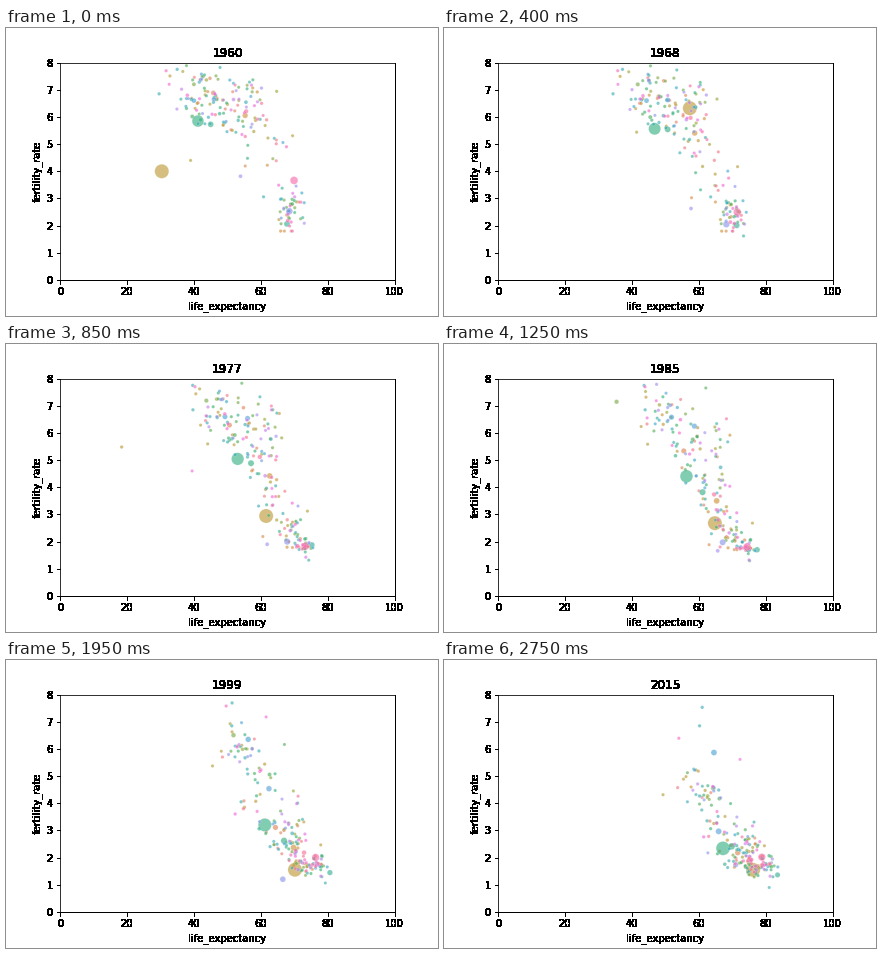
Animation of 432 by 288 pixels, one loop 2800 ms. Source, as a matplotlib script:

```python
import numpy as np
import matplotlib.pyplot as plt
from matplotlib.animation import FuncAnimation
from matplotlib.colors import to_rgb

FIRST, LAST = 1960, 2015
YEARS = np.arange(FIRST, LAST + 1)
WHEEL = ["#f77189", "#ce9032", "#97a431", "#32b166",
         "#36ada4", "#39a7d0", "#a48cf4", "#f561dd"]
SMALL, LARGE = 10, 200

rng = np.random.default_rng(12)
countries = []  # (hue, share per year, life per year, fertility per year)


def wheel_color(hue):
    stops = np.array([to_rgb(c) for c in WHEEL + WHEEL[:1]])
    pos = np.linspace(0, 1, len(stops))
    return [np.interp(hue, pos, stops[:, k]) for k in range(3)]


def country(hue, share, life, high, *falls, crisis=None):
    """Life runs through evenly spaced levels; each fall is (drop, year, width).

    A crisis is (year, width, loss of life, loss of fertility).
    """
    share = np.linspace(share[0], share[-1], len(YEARS))
    life = np.interp(YEARS, np.linspace(FIRST, LAST, len(life)), life)
    fert = np.full(len(YEARS), float(high))
    for drop, year, width in falls:
        fert -= drop / (1 + np.exp((year - YEARS) / width))
    if crisis:
        year, width, life_loss, fert_loss = crisis
        pulse = np.exp(-0.5 * ((YEARS - year) / width) ** 2)
        life = life - life_loss * pulse
        fert -= fert_loss * pulse
    countries.append((hue, share, life, fert))


def crowd(count, life, spread, high, low, mid, width):
    """Small countries; high, low and mid are (mean, spread)."""
    for _ in range(count):
        rank = np.clip(rng.normal(), -1.7, 1.7)
        noise = np.clip(rng.normal(size=6), -1.8, 1.8)
        level = np.array(life) + np.array(spread) * (0.75 * rank + 0.65 * noise[:3])
        top = high[0] + high[1] * noise[3]
        floor = low[0] + low[1] * (noise[4] - 0.2 * rank)
        turn = mid[0] + mid[1] * (0.75 * noise[5] - 0.65 * rank)
        share = 0.0015 / (rng.random() + 0.03)
        country(rng.random(), [share], level, top, (top - floor, turn, width))


# The most populous countries
country(0.165, (1, 1), (53.5, 62.2, 69.3, 76.2), 6.45,
        (3.75, 1973, 1.5), (1.15, 1991, 1.5), crisis=(1960, 1, 23.1, 2.45))
country(0.43, (0.675, 0.955), (41.2, 54, 60.3, 67.2), 6.2, (4.3, 1989, 12))
country(0.95, (0.27, 0.234), (69.9, 73.5, 76, 78.8), 3.92,
        (2.15, 1966, 3), (-0.25, 1990, 3))
country(0.72, (0.18, 0.105), (68.5, 67.8, 65.9, 71), 2.65,
        (0.65, 1963, 2), (0.85, 1992, 2), (-0.65, 2008, 3))
country(0.47, (0.14, 0.093), (67.8, 75.8, 80.2, 83.5), 2.1, (0.75, 1984, 8))
country(0.435, (0.13, 0.188), (45, 58, 66.5, 69.8), 5.8, (3.4, 1983, 6))
country(0.12, (0.108, 0.149), (55.3, 63.2, 69, 75), 6.9, (5.2, 1978, 11))
country(0.08, (0.072, 0.114), (45.8, 51, 63.3, 71.6), 6.95, (4.9, 1990, 7))
country(0.66, (0.068, 0.138), (46, 56.8, 61.9, 65.9), 6.65, (3.9, 1998, 6))
country(0.64, (0.068, 0.132), (40, 50, 55, 64.5), 6.6, (0.8, 2003, 5))
country(0.97, (0.05, 0.067), (55.6, 60, 72.5, 75.6), 6.3, (4.4, 1983, 6))

# Countries far from the main cloud
country(0.29, (0.033, 0.073), (40, 44, 50, 64.3), 7.2, (3, 2005, 5),
        crisis=(1984.5, 1.6, 11.3, 0))
country(0.16, (0.01,), (41, 45, 57, 68.5), 6.5, (3.9, 1997, 4),
        crisis=(1976.8, 1.6, 26.5, 1))
country(0.74, (0.006,), (43, 47, 48, 66.5), 8.3, (4.3, 1997, 6),
        crisis=(1994, 0.7, 35, 0))
country(0.41, (0.007,), (42, 51, 58, 63.5), 5.9, (3, 1998, 6),
        crisis=(2010, 0.5, 30, 0))
country(0.88, (0,), (32.6, 40, 60, 72.3), 7.2, (2.4, 2013, 3),
        crisis=(1977, 2.5, 0, 2.6))
country(0.55, (0.01,), (35, 40, 50, 61), 7.75, (0.25, 2005, 5))
country(0.53, (0.01,), (29.6, 40.5, 50, 60.2), 6.85)
country(0.92, (0.006,), (31.7, 41, 49, 54), 7.7, (1.6, 2009, 4))
country(0.2, (0.003,), (39, 44.5, 45, 49.3), 5.6, (1.6, 2008, 5),
        crisis=(1960, 4, 0, 1.2))
for hue in (0.5, 0.99, 0.17, 0.86, 0.05):
    country(hue, (0.01,), np.array([47, 57, 62, 66]) + rng.uniform(-2, 2),
            rng.uniform(5.9, 6.8), (3.5, rng.uniform(1989, 1997), 7),
            crisis=(2005, 5.5, rng.uniform(12, 20), 0))
country(0.52, (0,), (64, 72, 79, 81), 5.5, (3.8, 1965, 2), (0.8, 1995, 3))

# Everyone else, by kind of transition
crowd(26, (69.5, 75, 81), (2.2, 1.4, 1.3), (2.8, 0.45), (1.7, 0.2), (1971, 3), 3)
crowd(20, (66.5, 70.5, 75.5), (2.5, 1.3, 2), (2.7, 0.5), (1.55, 0.15), (1990, 3), 4)
crowd(46, (58, 68, 75.5), (5, 4, 2.8), (6.5, 0.6), (2.0, 0.35), (1974, 9), 7)
crowd(20, (51, 65, 74.5), (5.5, 4, 3.2), (7.3, 0.45), (2.6, 0.5), (1990, 6), 6)
crowd(24, (46, 57, 69), (5, 5, 3.5), (6.6, 0.5), (2.4, 0.5), (1990, 7), 7)
crowd(36, (42, 52, 61.5), (4.5, 4.5, 3.5), (6.75, 0.55), (3.4, 0.5), (2006, 6), 8)

countries.sort(key=lambda c: c[0])
hues, shares, lives, ferts = (np.array(col) for col in zip(*countries))
sizes = SMALL + (LARGE - SMALL) * shares


def harden(img, dpi):
    """Turn every touched pixel solid black, without antialiasing."""
    img[..., :3] = 0
    img[..., 3] = np.ceil(img[..., 3])
    return img, 0, 0


fig, ax = plt.subplots(figsize=(6, 4), dpi=72, facecolor="white")
fig.subplots_adjust(left=0.125, right=0.9, bottom=0.125, top=0.88)
ax.set(xlim=(0, 100), ylim=(0, 8), xticks=range(0, 101, 20), yticks=range(9),
       xlabel="life_expectancy", ylabel="fertility_rate")
title = ax.set_title(str(FIRST))
dots = ax.scatter(lives[:, 0], ferts[:, 0], s=sizes[:, 0],
                  c=[wheel_color(h) for h in hues],
                  alpha=0.62, edgecolors="white", linewidths=0.25)

# The left and top spines lie on the white plot area and stay soft
solid = [title, ax.xaxis.label, ax.yaxis.label,
         ax.spines["right"], ax.spines["bottom"]]
for axis in (ax.xaxis, ax.yaxis):
    solid += [*axis.get_ticklabels(), *axis.get_ticklines()]
for artist in solid:
    artist.set_agg_filter(harden)


def update(i):
    dots.set_offsets(np.column_stack([lives[:, i], ferts[:, i]]))
    dots.set_sizes(sizes[:, i])
    title.set_text(str(YEARS[i]))
    return dots, title


anim = FuncAnimation(fig, update, frames=len(YEARS), interval=50,
                     repeat=True, repeat_delay=0, blit=False)
plt.show()
```
